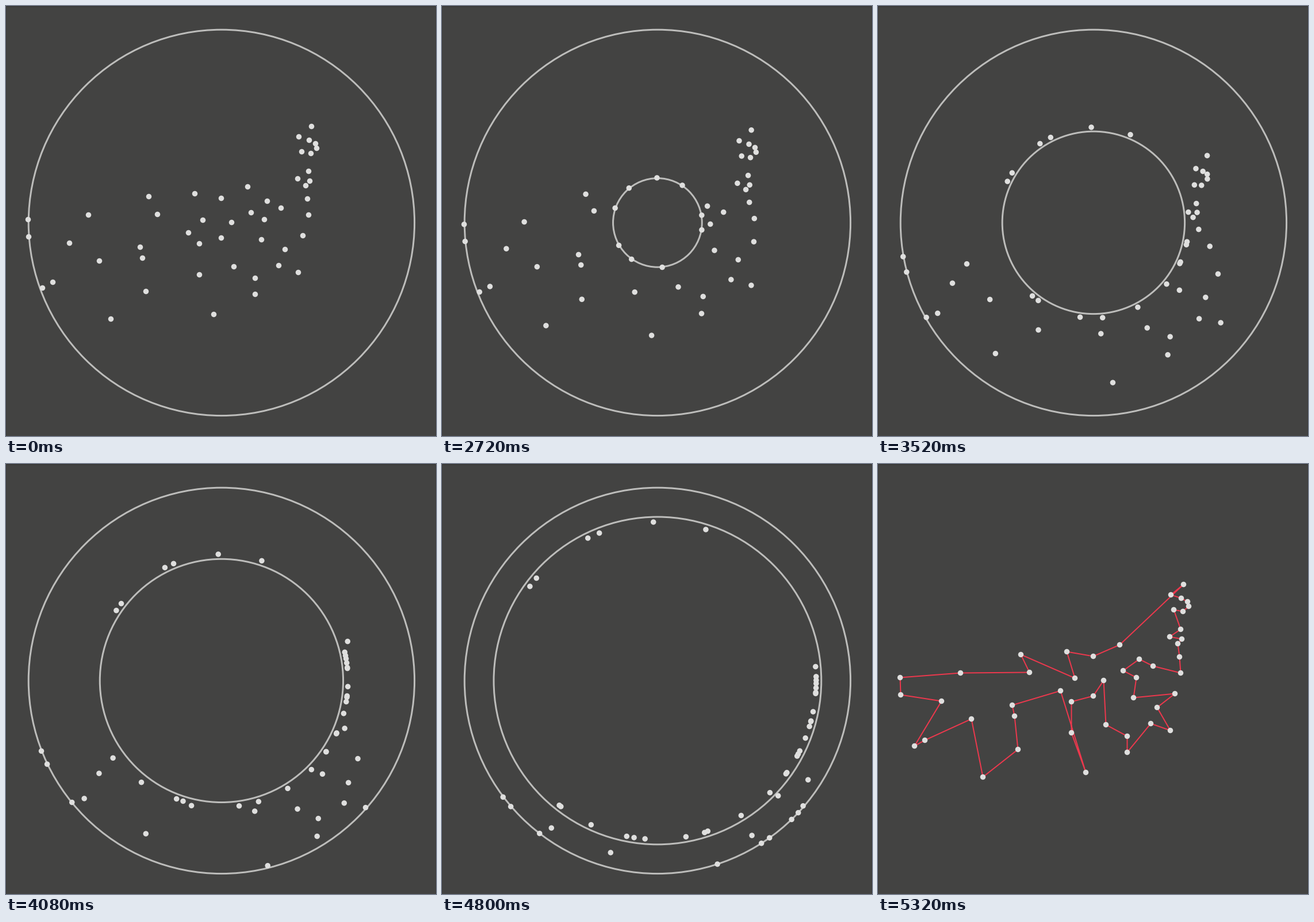
A matplotlib script that plays this animation: 748 px wide and 748 px high, repeating every 8400 ms.

```python
import numpy as np
import matplotlib.pyplot as plt
from matplotlib.animation import FuncAnimation
from matplotlib.collections import EllipseCollection
from matplotlib.patches import Circle, Rectangle

SIZE, DPI, STEP, FRAMES = 748, 100, 40, 210
GO, HOLD, DONE = 50, 91, 133      # ring starts, one repeated pose, tour shown
CENTER = np.array([374.4, 376.4])
RADIUS = 335.7
GROWTH = 4.07                     # ring radius gained per step
BG, RING, DOT, TOUR = "#434342", "#bdbdbb", "#dfdfde", "#ec384d"
PX = 72 / DPI

# Dots in tour order
home = np.array([
    (531, 209), (509, 227), (527, 233), (538, 239), (540, 247), (530, 256),
    (514, 253), (526, 287), (507, 300), (528, 304), (521, 312), (524, 335),
    (526, 363), (478, 351), (454, 339), (426, 359), (449, 371), (444, 406),
    (516, 399), (485, 423), (508, 463), (474, 451), (433, 501), (433, 473),
    (396, 453), (392, 376), (374, 403), (336, 413), (336, 467), (361, 536),
    (317, 394), (233, 419), (237, 438), (243, 496), (182, 544), (162, 443),
    (81, 480), (63, 490), (110, 412), (39, 401), (38, 371), (143, 363),
    (263, 362), (248, 331), (342, 372), (328, 326), (374, 334), (420, 314)], float)

dx, dy = (home - CENTER).T
r0 = np.hypot(dx, dy)
a0 = (np.degrees(np.arctan2(dy, dx)) + 50) % 360 - 50   # -50 to 310 degrees

# Dots gather round two directions; those far from the centre turn less and later
top = a0 > 185
gather = np.where(top, 268, 52)
reach = np.where(top, 120, 295)
delay = 28 + 0.1 * r0
turn = (gather - a0) * 0.92 * np.exp(-r0 / reach)

# Dots towards the lower right are driven outwards most
drift = np.exp(-((a0 - 62) / 70) ** 4)


def eased(k):
    return 1 - np.exp(-(k / delay) ** 3)


def dots_at(k):
    # The pushed dots run a little ahead of the ring, then fall behind it
    front = np.interp(k, [0, 19, 39, 52, 70, 82], [0, 78, 166, 220, 276, 305])
    r = np.maximum(r0 + drift * max(front - 40, 0), front)
    r = np.minimum(r, np.maximum(r0, RADIUS))
    a = np.radians(a0 + turn * eased(k) / eased(70))
    return CENTER + np.column_stack([r * np.cos(a), r * np.sin(a)])


fig = plt.figure(figsize=(SIZE / DPI, SIZE / DPI), dpi=DPI, facecolor=BG)
ax = fig.add_axes([0, 0, 1, 1])
ax.set_xlim(-0.5, SIZE - 0.5)
ax.set_ylim(SIZE - 0.5, -0.5)
ax.axis("off")

for x, y, w, h in ((0, 0, SIZE, 2), (0, 0, 1, SIZE), (SIZE - 1, 0, 1, SIZE)):
    ax.add_patch(Rectangle((x - 0.5, y - 0.5), w, h, color="#393938", lw=0))


def add_ring(radius):
    return ax.add_patch(Circle(CENTER, radius, fill=False, ec=RING, lw=3 * PX))


outer, inner = add_ring(RADIUS), add_ring(GROWTH)
loop = np.vstack([home, home[:1]])
tour, = ax.plot(*loop.T, color=TOUR, lw=2 * PX, solid_joinstyle="round", zorder=2)
diameters = np.full(len(home), 9.5)
dots = EllipseCollection(diameters, diameters, np.zeros(len(home)), units="xy",
                         offsets=home, offset_transform=ax.transData,
                         facecolors=DOT, linewidths=0, zorder=3)
ax.add_collection(dots, autolim=False)


def draw(n):
    moving, done = GO <= n < DONE, n >= DONE
    outer.set_visible(not done)
    inner.set_visible(moving)
    tour.set_visible(done)
    if moving:
        k = n - GO + 1 - (n >= HOLD)
        inner.set_radius(GROWTH * k)
        dots.set_offsets(dots_at(k))
    else:
        dots.set_offsets(home)
    return outer, inner, tour, dots


anim = FuncAnimation(fig, draw, frames=FRAMES, interval=STEP, repeat=True,
                     repeat_delay=0, blit=False)
plt.show()
```
